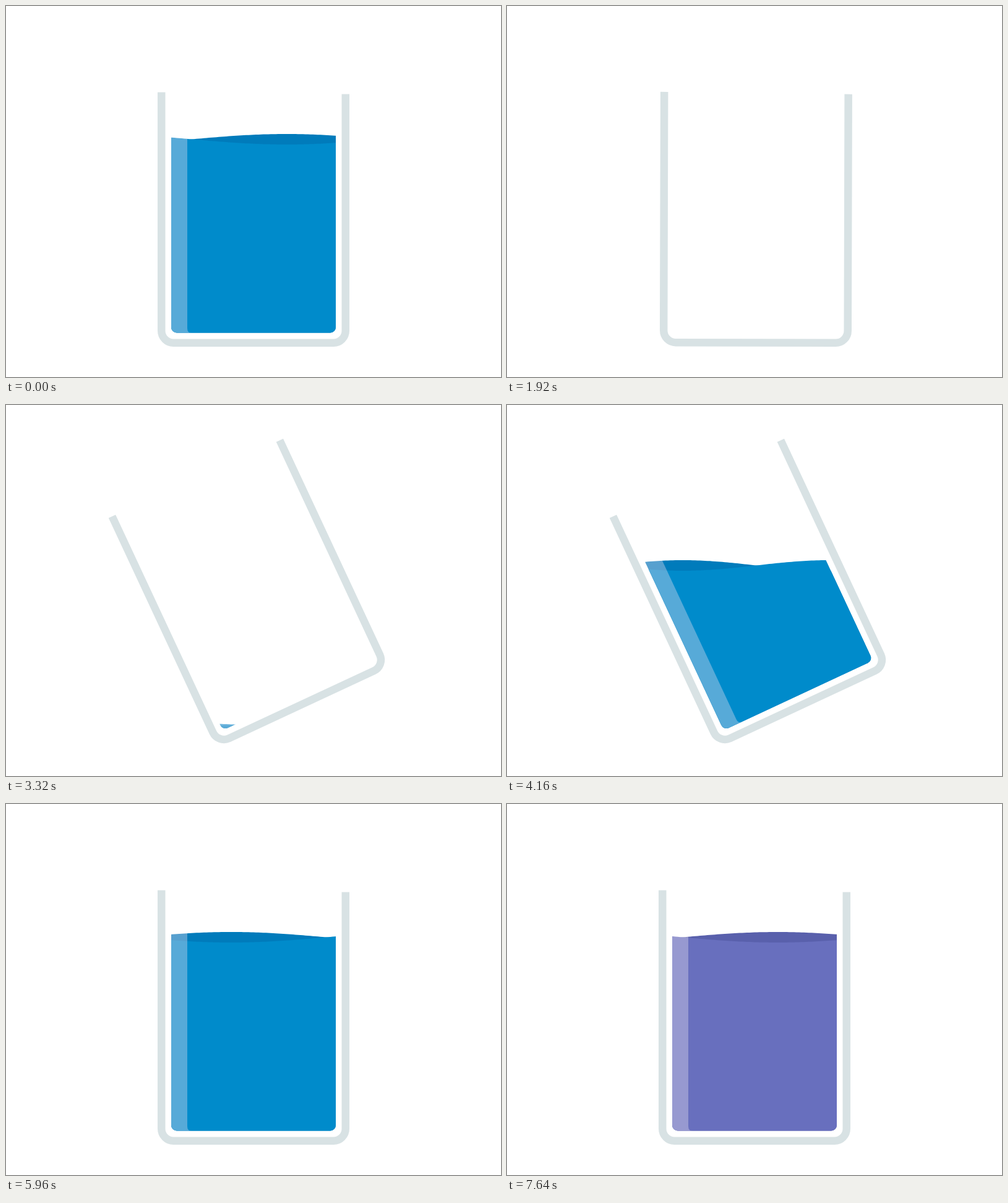
An HTML page with a canvas that plays this animation: 800 by 600 pixels, repeating every 7680 ms.

```html
<!DOCTYPE html>
<html lang="en">
<head>
<meta charset="utf-8">
<title>Water glass</title>
<style>
  html, body { margin: 0; width: 100%; height: 100%; overflow: hidden; background: #fff; }
  canvas { display: block; width: 800px; height: 600px; }
</style>
</head>
<body>
<canvas id="stage" width="800" height="600"></canvas>
<script>
const ctx = document.getElementById('stage').getContext('2d');
const LOOP = 7680, STEP = 40;
const FULL = 215.5, TILTED = 259.5, EMPTY = 540, FLOOR = 528.5;
const LEAN = 25, SHIFT = 81.4;

const blue = { main: [0, 139, 203], dark: [0, 123, 187] };
const violet = { main: [104, 111, 190], dark: [89, 96, 172] };

const lerp = (a, b, k) => a + (b - a) * k;
const blend = (a, b, k) => `rgb(${a.map((v, i) => Math.round(lerp(v, b[i], k))).join()})`;
const progress = (t, from, to) => Math.max(0, Math.min(1, (t - from) / (to - from)));
const easeOut = (k, power) => 1 - (1 - k) ** power;
const easeBoth = k => k * k * (3 - 2 * k);
const windUp = k => k * k * (4 * k - 3);

// Degrees: swing right, lean left, then a damped swing back to upright.
function angleAt(t) {
  if (t < 4160) return -LEAN * windUp(easeOut(progress(t, 1900, 2780), 2));
  const k = progress(t, 4160, 5090);
  return -LEAN * (1 - k) ** 1.08 * Math.cos(1.5 * Math.PI * (k / 0.774) ** 1.435);
}

function slideAt(t) {
  return t < 4160
    ? SHIFT * easeOut(progress(t, 1900, 2780), 2) ** 1.2
    : SHIFT * (1 - progress(t, 4160, 4800)) ** 2;
}

function levelAt(t) {
  if (t < 3290) return lerp(FULL, EMPTY, progress(t, 0, 920) ** 2);
  if (t < 4160) return lerp(530, TILTED, easeOut(progress(t, 3290, 4160), 1.4));
  return lerp(TILTED, FULL, easeBoth(progress(t, 4160, 4800)));
}

// Five wavelengths pass in one loop, slightly slower at first.
const phaseAt = t => 0.087 + 5 * t / LOOP - 0.04 * Math.sin(Math.PI * t / LOOP);

// The glass leans on its left or right bottom corner.
function pose(t) {
  const a = angleAt(t);
  const x = a < 0 ? 270.75 : 529.25, y = 525.25;
  const drop = a < 0 ? a * 0.154 : Math.min(3, a * 0.43);
  ctx.translate(x + slideAt(t), y + drop);
  ctx.rotate(a * Math.PI / 180);
  ctx.translate(-x, -y);
}

// An open-topped box with rounded bottom corners.
function cup(left, right, bottom, radius, leftTop, rightTop) {
  ctx.beginPath();
  ctx.moveTo(left, leftTop);
  ctx.arcTo(left, bottom, right, bottom, radius);
  ctx.arcTo(right, bottom, right, rightTop, radius);
  ctx.lineTo(right, rightTop);
}

function drawGlass() {
  cup(251.25, 548.75, 544.75, 19.5, 139.5, 142.5);
  ctx.lineWidth = 12.5;
  ctx.strokeStyle = '#d8e2e4';
  ctx.stroke();
}

function drawWave(t, side, color) {
  const mid = levelAt(t), a = angleAt(t), phase = phaseAt(t);
  const slope = -0.0065 * Math.max(0, a);
  const length = 612 + 5.6 * Math.min(0, a);
  const height = Math.max(0, Math.min(8.5, (FLOOR - mid) / 4));
  ctx.beginPath();
  ctx.moveTo(100, 620);
  for (let x = 100; x <= 700; x += 4) {
    const swell = Math.cos(2 * Math.PI * ((x - 400) / length - phase));
    ctx.lineTo(x, mid + (x - 400) * slope + side * height * swell);
  }
  ctx.lineTo(700, 620);
  ctx.fillStyle = color;
  ctx.fill();
}

// A pale strip along the left wall, tinting only the water.
function drawShine() {
  ctx.beginPath();
  ctx.moveTo(260, 100);
  ctx.lineTo(293, 100);
  ctx.lineTo(293, 521);
  ctx.quadraticCurveTo(293, 529, 300, 529);
  ctx.lineTo(260, 535);
  ctx.globalCompositeOperation = 'source-atop';
  ctx.fillStyle = 'rgba(230,222,240,0.38)';
  ctx.fill();
}

function drawWater(t) {
  const depth = FLOOR - levelAt(t), k = progress(t, 6720, 7640);
  if (depth <= 0) return;
  ctx.save();
  pose(t);
  cup(267, 533, FLOOR, 9, 100, 100);
  ctx.clip();
  ctx.save();
  ctx.resetTransform();
  ctx.globalAlpha = Math.min(1, depth / 14);
  drawWave(t, -1, blend(blue.dark, violet.dark, k));
  drawWave(t, 1, blend(blue.main, violet.main, k));
  ctx.restore();
  drawShine();
  ctx.restore();
}

function draw(t) {
  ctx.clearRect(0, 0, 800, 600);
  drawWater(t);
  ctx.save();
  pose(t);
  drawGlass();
  ctx.restore();
}

const start = performance.now();
function tick() {
  const t = (performance.now() - start) % LOOP;
  draw(Math.floor(t / STEP) * STEP);
  requestAnimationFrame(tick);
}
tick();
</script>
</body>
</html>
```
